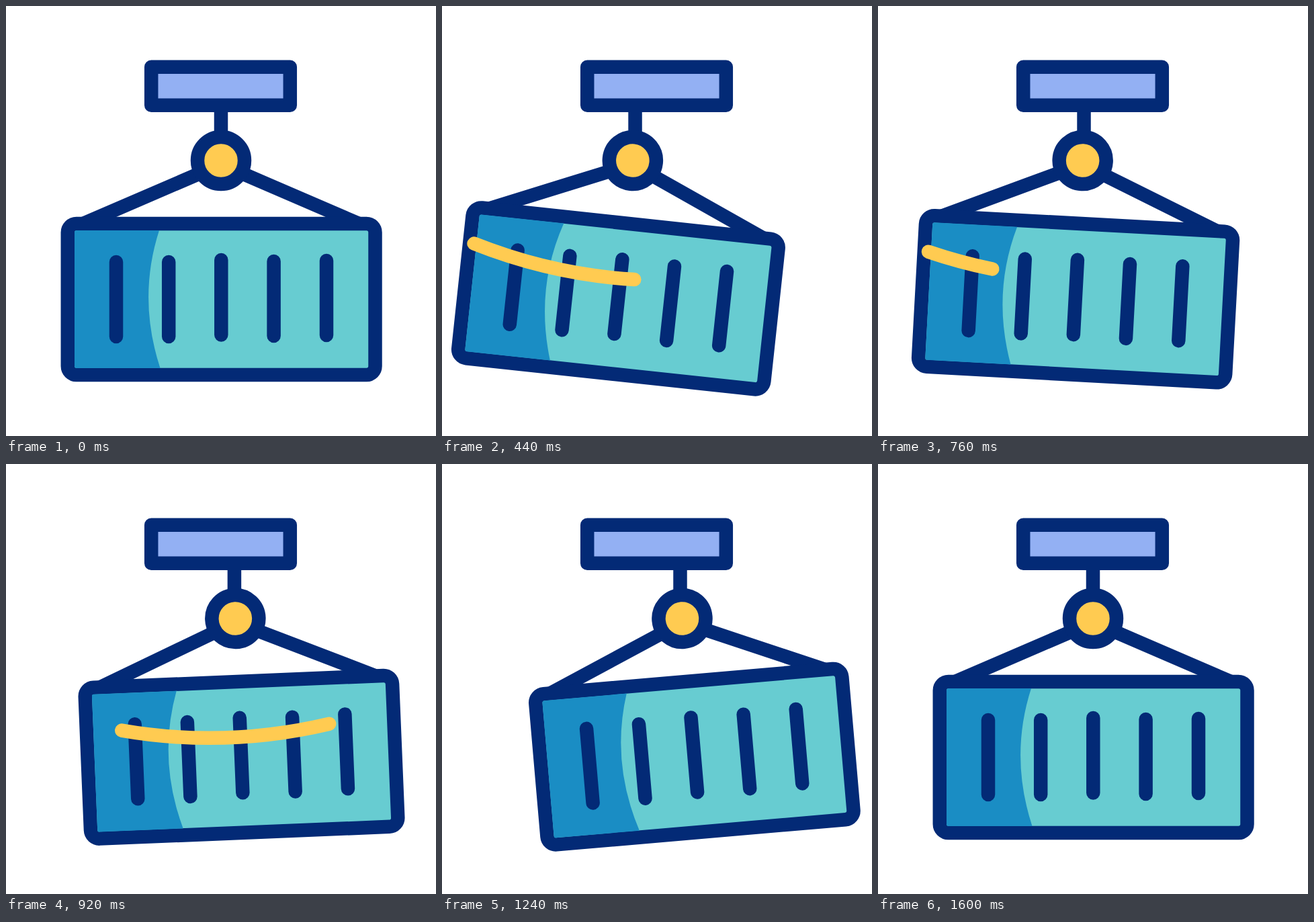
These frames come from a looping animation (640 by 640 pixels, 2000 ms). An HTML page:

```html
<!DOCTYPE html>
<html lang="en">
<head>
<meta charset="utf-8">
<title>Swinging container</title>
<style>
  html, body { margin: 0; height: 100%; overflow: hidden; background: #fff; }
  svg { display: block; width: 100%; height: 100%; }
  .line { stroke: #032a76; stroke-width: 20.5; stroke-linecap: round; stroke-linejoin: round; }
</style>
</head>
<body>
<svg viewBox="0 0 640 640">
  <path id="rod" class="line" d="M320 150V192"/>
  <rect class="line" x="216.2" y="90.8" width="206.6" height="57" fill="#93b0f3"/>
  <g id="load">
    <g class="line" fill="none">
      <path d="M116 323.5L290 248.5M524 323.5L350 248.5"/>
      <circle cx="320" cy="230" r="35" fill="#ffcb51"/>
      <rect x="91.8" y="324" width="457.7" height="225" rx="13" fill="#67ccd1"/>
    </g>
    <path fill="#1a8dc4" d="M105 334H228Q195.500 435 229.500 539H105Q102 539 102 536V337Q102 334 105 334"/>
    <path class="line" d="M164 381V492M242.200 381V492M320.300 378V489.500M398.600 380V491M477 379V490"/>
    <path id="trail" pathLength="1" fill="none" stroke="#ffcb51" stroke-width="20.5"
          stroke-linecap="round" d="M98 378Q320 440 549 368"/>
  </g>
</svg>
<script>
const [rod, load, trail] = ["rod", "load", "trail"].map(id => document.getElementById(id));
const LOOP = 2000, STEP = 40;

const progress = (t, start, length) => Math.min(1, Math.max(0, (t - start) / length));
const smooth = p => p * p * (3 - 2 * p);
const soft = p => (p + smooth(p)) / 2;
const mix = (a, b, p) => a + (b - a) * p;

// Each swing: start, duration, [shift, angle] from and to, easing
const rest = [0, 0], left = [-41, 6.95], right = [47, -6.2];
const swings = [
  [0, 560, rest, left, smooth],
  [560, 560, left, right, smooth],
  [1120, 480, right, rest, soft],
];

function pose(t) {
  const [start, length, from, to, ease] = swings.findLast(s => t >= s[0]);
  const p = ease(progress(t, start, length));
  return from.map((value, i) => mix(value, to[i], p));
}

// Visible part of the trail, measured from its left end
function trailRange(t) {
  const sweep = start => smooth(progress(t, start, 400));
  return t < 640 ? [1 - sweep(46), 1 - sweep(250)] : [sweep(840), sweep(640)];
}

function draw(t) {
  const [shift, angle] = pose(t);
  rod.setAttribute("transform", `translate(${shift + 0.6 * angle})`);
  load.setAttribute("transform", `translate(${shift}) rotate(${angle} 320 230)`);

  const [a, b] = trailRange(t);
  trail.style.visibility = b - a > 0.003 ? "visible" : "hidden";
  trail.setAttribute("stroke-dasharray", `${b - a} 2`);
  trail.setAttribute("stroke-dashoffset", -a);
}

function tick() {
  draw(Math.floor(performance.now() % LOOP / STEP) * STEP);
  requestAnimationFrame(tick);
}
tick();
</script>
</body>
</html>
```
